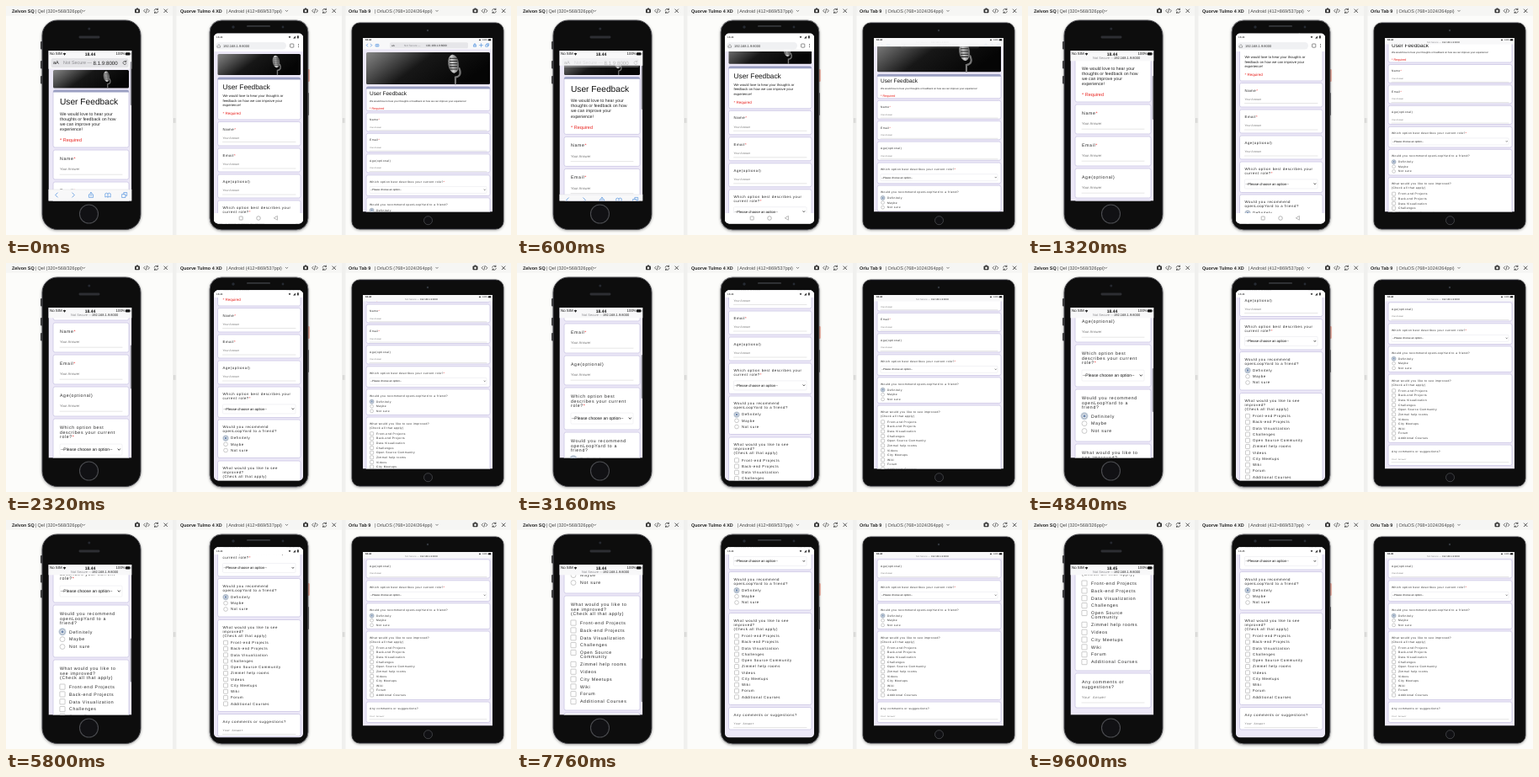
An HTML page for the animation above (9720 ms loop, 600x272 px).

```html
<!DOCTYPE html>
<html lang="en">
<head>
<meta charset="utf-8">
<title>User Feedback on three devices</title>
<style>
  html, body { margin: 0; width: 100%; height: 100%; overflow: hidden; background: #fcfcfa; }
  svg { display: block; width: 600px; height: 272px; font-family: "Liberation Sans", Arial, sans-serif; }
  text { text-rendering: geometricPrecision; white-space: pre; }
</style>
</head>
<body>
<script>
const LOOP = 9720;
const CLOCK_TICK = 8000;
const THUMB_HIDE = 9600;

// start, end, steps, then where each page has scrolled to at the end
const SCROLLS = [
  [40, 120, 3, 6, 5, 4],
  [440, 1320, 15, 54, 46, 57.5],
  [1440, 1440, 1, 58, 49, 60],
  [1640, 2320, 6, 100, 84, 78],
  [2600, 3160, 5, 137, 112, 92],
  [3440, 4040, 4, 160, 138, 113],
  [4440, 4840, 3, 188, 164.5, 129],
  [5000, 5320, 3, 212, 188, 129],
  [5560, 5800, 2, 237, 200.5, 129],
  [6120, 6960, 6, 282, 208.5, 129],
  [7240, 7480, 2, 304, 208.5, 129],
  [7760, 7760, 1, 313, 208.5, 129],
  [8000, 8480, 3, 340, 208.5, 129],
  [8880, 8880, 1, 354, 208.5, 129],
  [9240, 9240, 1, 360, 208.5, 129]
];

const ROLES = ['Definitely', 'Maybe', 'Not sure'];
const TOPICS = ['Front-end Projects', 'Back-end Projects', 'Data Visualization', 'Challenges',
  'Open Source Community', 'Zimmel help rooms', 'Videos', 'City Meetups', 'Wiki', 'Forum',
  'Additional Courses'];

const phone = {
  id: 'phone', screen: [50.5, 53, 98.8, 178.5], card: [56, 90], x: 64, itemX: 75, mark: 67,
  image: [76, 21.5], tops: [100, 171, 209, 247, 285, 338, 403, 542],
  bottoms: [168, 206, 244, 282, 335, 400, 539, 583],
  title: [10.2, 14], intro: [5.2, 28], required: [5.5, 59.5], font: 5.2, spacing: .66, small: 4.2,
  pad: 10, lead: 5.8, answer: 13, rule: 6.2, select: [15, 6.5, 5], first: 10.5, pitch: 8.85, box: 3.1,
  copy: 'We would love to hear your|thoughts or feedback on how|we can improve your|experience!',
  role: 'Which option best|describes your current|role?*',
  friend: 'Would you recommend|openLoopYard to a|friend?',
  topics: 'What would you like to|see improved?|(Check all that apply)',
  comments: 'Any comments or|suggestions?', wrapTopic: true
};
const tall = {
  id: 'tall', screen: [247, 32.5, 106, 226], card: [251.5, 98.5], x: 257.5, itemX: 267, mark: 261,
  image: [57, 25], tops: [85, 137.5, 169, 200, 231, 270, 319, 431],
  bottoms: [135, 166, 197, 228, 267.5, 315.5, 428, 457.5],
  title: [8.3, 11], intro: [4.15, 22], required: [4.5, 43], font: 4.3, spacing: .55, small: 3.5,
  pad: 8.7, lead: 5, answer: 10.5, rule: 4.8, select: [12.7, 5.5, 4.2], first: 8.6, pitch: 7.25, box: 2.5,
  copy: 'We would love to hear your thoughts or|feedback on how we can improve your|experience!',
  role: 'Which option best describes your|current role?*',
  friend: 'Would you recommend|openLoopYard to a friend?',
  topics: 'What would you like to see|improved?|(Check all that apply)',
  comments: 'Any comments or suggestions?'
};
const tablet = {
  id: 'tablet', screen: [424, 38, 154, 206.5], card: [428, 147], x: 432, itemX: 440, mark: 434.6,
  image: [55, 38], tops: [96, 127, 151.3, 175.8, 200.8, 227.8, 261, 345],
  bottoms: [124.5, 149, 173.5, 198, 225.5, 258.5, 342.5, 369.5],
  title: [6.5, 8], intro: [2.87, 16.7], required: [3.7, 25.5], font: 3.3, spacing: .43, small: 2.5,
  pad: 7.9, lead: 4.6, answer: 8.8, rule: 4, select: [9.7, 4, 3], first: 7.2, pitch: 5.63, box: 2,
  copy: 'We would love to hear your thoughts or feedback on how we can improve your experience!',
  role: 'Which option best describes your current role?*',
  friend: 'Would you recommend openLoopYard to a friend?',
  topics: 'What would you like to see improved?|(Check all that apply)',
  comments: 'Any comments or suggestions?'
};
const devices = [phone, tall, tablet];

const rect = (x, y, w, h, fill, r = 0, more = '') =>
  `<rect x="${x}" y="${y}" width="${w}" height="${h}" rx="${r}" fill="${fill}" ${more}/>`;
const circle = (x, y, r, fill, more = '') => `<circle cx="${x}" cy="${y}" r="${r}" fill="${fill}" ${more}/>`;
const line = (d, color, width = .6) =>
  `<path d="${d}" fill="none" stroke="${color}" stroke-width="${width}" stroke-linecap="round"/>`;
// y is the vertical middle of the lower-case letters
const text = (x, y, words, size, fill = '#222', more = '') =>
  `<text x="${x}" y="${y + size * .33}" font-size="${size}" fill="${fill}" ${more}>${words}</text>`;
const group = (id, body, more = '') => `<g id="${id}" ${more}>${body}</g>`;

function banner(d) {
  const [x, w] = d.card, [y, h] = d.image;
  const cx = x + w * .705, r = h * .2;
  let grill = '';
  for (let i = -2; i <= 2; i++) {
    const gy = y + h * .36 + i * r * .42;
    grill += line(`M${cx - r * .55} ${gy}h${r * 1.1}`, '#222', r * .14);
  }
  return rect(x, y, w, h, 'url(#stage)', 1.5) +
    line(`M${cx + r * .9} ${y + h * .5}q${r * .5} ${h * .25} ${-r * .6} ${h * .28}V${y + h - .5}`, '#777', r * .28) +
    `<ellipse cx="${cx}" cy="${y + h * .36}" rx="${r * .85}" ry="${r * 1.45}" fill="url(#metal)" transform="rotate(-8 ${cx} ${y + h * .36})"/>` + grill;
}

function page(d) {
  const [cx, cw] = d.card;
  const right = cx + cw - (d.x - cx);
  const spaced = `letter-spacing="${d.spacing}"`;
  const card = i => rect(cx, d.tops[i], cw, d.bottoms[i] - d.tops[i], '#fff', 2.2, 'stroke="#cbc6e4" stroke-width=".8"');
  const lastLine = (i, copy) => d.tops[i] + d.pad + (copy.split('|').length - 1) * d.lead;
  const label = (i, copy) => card(i) + copy.split('|').map((s, k) =>
    text(d.x, d.tops[i] + d.pad + k * d.lead, s.replace('*', '<tspan fill="#e22">*</tspan>'), d.font, '#222', spaced)).join('');
  const answer = (i, copy, more = '') => {
    const y = lastLine(i, copy) + d.answer;
    return label(i, copy) + text(d.x, y, 'Your Answer', d.small, '#777', more) +
      line(`M${d.x} ${y + d.rule}H${right}`, '#ccc', .5);
  };
  const option = (y, s) => text(d.itemX, y, s, d.font, '#222', spaced);

  let out = banner(d) + card(0) +
    `<path d="M${cx} ${d.tops[0] + 2.4}v-.6q0-2 2-2h${cw - 4}q2 0 2 2v.6z" fill="#9ba0c3"/>` +
    text(d.x, d.tops[0] + d.title[1], 'User Feedback', d.title[0], '#111') +
    d.copy.split('|').map((s, k) =>
      text(d.x, d.tops[0] + d.intro[1] + k * d.lead * 1.06, s, d.intro[0])).join('') +
    text(d.x, d.tops[0] + d.required[1], '* Required', d.required[0], '#e8201c') +
    answer(1, 'Name*') + answer(2, 'Email*') + answer(3, 'Age(optional)');

  const [drop, half, size] = d.select;
  let y = lastLine(4, d.role) + drop;
  out += label(4, d.role) + rect(d.x, y - half, right - d.x, half * 2, '#fff', 1, 'stroke="#e4e4ea" stroke-width=".5"') +
    text(d.x + 1, y, '--Please choose an option--', size, '#111') +
    line(`M${right - size} ${y - size * .15}l${size * .25} ${size * .3}l${size * .25} ${-size * .3}`, '#222', size * .16);

  out += label(5, d.friend);
  y = lastLine(5, d.friend) + d.first - .3;
  ROLES.forEach((s, k) => {
    const ry = y + k * d.pitch;
    out += k ? circle(d.mark, ry, d.box * .95, '#fff', 'stroke="#999" stroke-width=".5"')
      : circle(d.mark, ry, d.box * 1.45, '#c3cfdd') +
        circle(d.mark, ry, d.box, '#e8eef5', 'stroke="#7d8794" stroke-width=".5"') +
        circle(d.mark, ry, d.box * .5, '#6d87ad');
    out += option(ry, s);
  });

  out += label(6, d.topics);
  y = lastLine(6, d.topics) + d.first;
  for (const s of TOPICS) {
    out += rect(d.mark - d.box, y - d.box, d.box * 2, d.box * 2, '#fff', .6, 'stroke="#999" stroke-width=".5"');
    if (d.wrapTopic && s.length > 20) {
      const cut = s.lastIndexOf(' ');
      out += option(y, s.slice(0, cut));
      y += 5;
      out += option(y, s.slice(cut + 1));
    } else out += option(y, s);
    y += d.pitch;
  }
  return out + answer(7, d.comments, 'font-family="Liberation Mono, monospace" letter-spacing=".1"');
}

const clock = (x, y, size, more) => text(x, y, '18.44', size, '#111', `class="clock" ${more || ''}`);
const wifi = (x, y, r) => `<path d="M${x} ${y + r}l${-r} ${-r * 1.3}q${r} ${-r * .8} ${2 * r} 0z" fill="#222"/>`;
const BLUE = '#3f86dc';
const back = (x, y, r) => line(`M${x + r / 2} ${y - r}l${-r} ${r}l${r} ${r}`, BLUE, .7);
const next = (x, y, r) => line(`M${x - r / 2} ${y - r}l${r} ${r}l${-r} ${r}`, BLUE, .7);
const share = (x, y, r) => line(`M${x - r * .4} ${y - r * .2}h${-r * .4}v${r * 1.1}h${r * 1.6}v${-r * 1.1}h${-r * .4}M${x} ${y + r * .4}V${y - r}l${-r * .4} ${r * .4}m${r * .4} ${-r * .4}l${r * .4} ${r * .4}`, BLUE);
const book = (x, y, r) => line(`M${x} ${y - r * .5}q${-r * .5} ${-r * .5} ${-r} 0v${r * 1.3}q${r * .5} ${-r * .4} ${r} 0q${r * .5} ${-r * .4} ${r} 0v${-r * 1.3}q${-r * .5} ${-r * .5} ${-r} 0v${r * 1.3}`, BLUE);
const tabs = (x, y, r) => line(`M${x - r} ${y - r * .3}h${r * 1.3}v${r * 1.3}h${-r * 1.3}zM${x - r * .4} ${y - r * .4}v${-r * .6}h${r * 1.3}v${r * 1.3}h${-r * .5}`, BLUE);
const address = '192.168.1.9:8000';

function phoneChrome() {
  return rect(50, 53, 100, 12.3, '#f8f8f9', 0, 'id="phoneBar"') +
    group('phoneFull', rect(53.5, 62, 92, 11, '#e4e4e7', 2.5) + text(56, 67.5, 'aA', 5.6) +
      text(68, 67.5, 'Not Secure —', 5.4, '#8a8a8e') + text(103.5, 67.5, '8.1.9:8000', 6.2) +
      line('M142.6 66.2a2 2 0 1 0 .3 2M142.8 64.8v1.6h-1.6', '#333')) +
    group('phoneMini', text(77, 62, 'Not Secure —', 4, '#8a8a8e') + text(102, 62, address, 4, '#222')) +
    text(52, 57, 'No SIM', 4.4, '#111') + wifi(69.5, 57, 1.8) + clock(100, 57, 5, 'text-anchor="middle" font-weight="bold"') +
    text(130.5, 57, '100%', 4.4, '#111') + rect(142, 55.3, 5.4, 3.2, '#111', .8) + rect(147.7, 56.3, .6, 1.2, '#111') +
    group('phoneTools', rect(50, 218, 100, 14, '#f8f8f9') + line('M50 218h100', '#d5d5d8', .4) +
      back(60, 224.5, 2.6) + next(80, 224.5, 2.6) + share(101, 224.5, 3.2) + book(121, 224.5, 3.2) + tabs(141, 224.5, 3)) +
    rect(147.7, 66, 1.3, 52, '#8d8d95', .65, 'id="thumb"');
}

function tallChrome() {
  return group('tallBar', rect(247, 40, 106, 14, '#fff') + rect(249, 43, 84, 8.4, '#f0f1f3', 4.2) +
      line('M251.3 47.3l1.6-1.6l1.6 1.6v1.8h-3.2z', '#555', .5) + text(258, 47.2, address, 4, '#333') +
      rect(337.6, 45, 4.2, 4.2, 'none', .7, 'stroke="#444" stroke-width=".6"') +
      [45.4, 47.1, 48.8].map(y => circle(347.5, y, .5, '#444')).join('')) +
    rect(247, 32, 106, 9, '#fff') + clock(250, 37, 3) + wifi(337, 37, 1.3) +
    `<path d="M341 38.5h3v-3z" fill="#333"/>` + rect(346, 35.3, 1.8, 3.2, '#333', .4) +
    group('tallNav', rect(247, 246, 106, 13, '#fff') +
      rect(277.2, 250, 4, 4, 'none', .4, 'stroke="#888" stroke-width=".6"') +
      circle(300, 252, 2.3, 'none', 'stroke="#888" stroke-width=".6"') + line('M322.4 249.8v4.4l-3.8-2.2z', '#888'));
}

function tabletChrome() {
  return rect(424, 38, 154, 8, '#f8f8f9', 0, 'id="tabletBar"') +
    group('tabletFull', back(429, 46.6, 1.5) + next(434, 46.6, 1.5) + book(441, 46.6, 1.9) +
      rect(456, 43.2, 93, 7, '#e6e6e9', 1.6) + text(458, 46.7, 'aA', 3) + text(473, 46.7, 'Not Secure —', 3.1, '#8a8a8e') +
      text(499, 46.7, address, 3.2) + share(557, 46.6, 1.9) + line('M562.5 46.6h4m-2-2v4', BLUE) + tabs(572, 46.5, 1.8)) +
    group('tabletMini', text(474, 43.5, 'Not Secure —', 2.7, '#8a8a8e') + text(492, 43.5, address, 2.7, '#222')) +
    clock(427, 40.3, 2.8, 'font-weight="bold"') + wifi(563, 40.3, 1.2) + text(566, 40.3, '100%', 2.5, '#111') +
    rect(573, 39.3, 3.3, 2, '#111', .5);
}

const bodies = {
  phone: [42, 52, 65, 83].slice(0, 1).concat(65, 83).map(y => rect(41, y, 3, 9.5, '#3b3b3d', 1)).join('') +
    rect(43, 17, 117, 248.5, '#08080a', 18, 'stroke="#4c4c50" stroke-width="1" filter="url(#shadow)"') +
    circle(98.8, 27, 1.5, '#25282f') + rect(86.5, 35.6, 25, 2.8, '#2d2e33', 1.4) +
    circle(98.5, 247, 11, '#111114', 'stroke="#4b4c50" stroke-width="1.1"'),
  tall: rect(357.5, 75, 3, 15, '#f5866f', 1) + rect(357.5, 103, 2.5, 27, '#333', 1) +
    rect(242, 17, 117, 249, '#0b0b0d', 14, 'stroke="#77777b" stroke-width="1" filter="url(#shadow)"') +
    rect(286, 23, 28, 1.8, '#35363a', .9) + circle(270, 25, 1.7, '#262a32') + circle(329, 25, 1.4, '#262a32'),
  tablet: rect(411, 20, 180, 245, '#08080a', 9, 'stroke="#38383c" stroke-width=".9" filter="url(#shadow)"') +
    circle(501, 29, 1.2, '#33363d') + circle(501.5, 254.7, 5, '#101013', 'stroke="#4b4c50" stroke-width=".8"')
};
const chrome = { phone: phoneChrome, tall: tallChrome, tablet: tabletChrome };

function device(d) {
  const [x, y, w, h] = d.screen;
  return bodies[d.id] + `<clipPath id="${d.id}Clip">${rect(x, y, w, h, '#000', d === tall ? 5 : 0)}</clipPath>` +
    `<g clip-path="url(#${d.id}Clip)">` + rect(x, y, w, h, '#ece8f7') +
    group(d.id + 'Page', page(d)) + chrome[d.id]() + '</g>';
}

function heading(x, name, specX, spec, arrowX, iconX) {
  const ink = '#333';
  return text(x, 5.8, name, 5.4, '#222', 'font-weight="bold"') + text(specX, 5.8, spec, 5.5, '#444') +
    line(`M${arrowX - 1.3} 5.2l1.3 1.3l1.3-1.3`, ink) +
    rect(iconX - 3, 3.6, 6, 4.6, ink, .9) + rect(iconX - 1.2, 2.6, 2.4, 1.5, ink, .4) + circle(iconX, 5.9, 1.3, '#f6f6f4') +
    line(`M${iconX + 9.3} 4l-1.7 1.8l1.7 1.8M${iconX + 12.7} 4l1.7 1.8l-1.7 1.8M${iconX + 11.6} 3.4l-1.2 4.8`, ink, .7) +
    line(`M${iconX + 20.2} 5.2a2.3 2.3 0 0 1 4.2-.8v-1.4m0 1.4h-1.4M${iconX + 24.8} 6.4a2.3 2.3 0 0 1-4.2.8v1.4m0-1.4h1.4`, ink, .7) +
    line(`M${iconX + 31.8} 3.9l3.8 3.8m0-3.8l-3.8 3.8`, ink, .8);
}

const stop = (at, color) => `<stop offset="${at}" stop-color="${color}"/>`;
document.body.innerHTML = `<svg viewBox="0 0 600 272" xmlns="http://www.w3.org/2000/svg"><defs>
  <linearGradient id="stage" x2="1" y2=".35">${stop(0, '#858585')}${stop(.22, '#565656')}${stop(.5, '#171717')}${stop(1, '#050505')}</linearGradient>
  <linearGradient id="metal">${stop(0, '#666')}${stop(.4, '#d2d2d2')}${stop(1, '#555')}</linearGradient>
  <filter id="shadow" x="-10%" y="-5%" width="120%" height="112%"><feDropShadow dx="0" dy="1" stdDeviation="1.4" flood-opacity=".35"/></filter>
  </defs>` + rect(0, 0, 600, 272, '#fcfcfa') + rect(0, 0, 600, 11.5, '#f6f6f4') +
  [198, 399].map(x => rect(x, 0, 4.5, 272, '#f0f0ee') +
    line(`M${x + 1.5} 133.5v5m1.5-5v5`, '#b5b5b3', .5)).join('') +
  heading(7, 'Zelvon SQ', 34.5, '| Qel (320×568/326ppi)', 92.5, 156) +
  heading(207, 'Quorve Tulmo 4 XD', 261.5, '| Android (412×869/537ppi)', 333.5, 356) +
  heading(407, 'Orlu Tab 9', 437.5, '| OrluOS (768×1024/264ppi)', 512, 557.5) +
  devices.map(device).join('') + '</svg>';

const poses = [{ at: 0, scroll: [0, 0, 0] }];
for (const [start, end, steps, ...goal] of SCROLLS) {
  const from = poses[poses.length - 1].scroll;
  for (let k = 0; k < steps; k++) {
    const at = steps > 1 ? 40 * Math.round((start + (end - start) * k / (steps - 1)) / 40) : start;
    poses.push({ at, scroll: goal.map((g, i) => from[i] + (g - from[i]) * (k + 1) / steps) });
  }
}

const el = id => document.getElementById(id);
const set = (id, name, value) => el(id).setAttribute(name, value);
const shift = (id, y) => set(id, 'transform', `translate(0 ${y})`);
const ramp = (v, from, to) => Math.min(1, Math.max(0, (v - from) / (to - from)));
const clocks = document.querySelectorAll('.clock');

function draw(t) {
  const { scroll } = poses.findLast(p => p.at <= t);
  devices.forEach((d, i) => shift(d.id + 'Page', -scroll[i]));

  const phoneFold = ramp(scroll[0], 8, 26);
  set('phoneBar', 'height', 21.7 - 9.4 * phoneFold);
  set('phoneFull', 'opacity', 1 - ramp(phoneFold, 0, .6));
  set('phoneMini', 'opacity', ramp(phoneFold, .5, 1));
  shift('phoneTools', 14 * phoneFold);
  shift('thumb', 113 * scroll[0] / 360);
  set('thumb', 'opacity', t < THUMB_HIDE ? 1 : 0);

  const tallFold = ramp(scroll[1], 50, 75);
  shift('tallBar', -14 * tallFold);
  shift('tallNav', 14 * tallFold);

  const tabletFold = ramp(scroll[2], 6, 22);
  set('tabletBar', 'height', 13.3 - 5.8 * tabletFold);
  set('tabletFull', 'opacity', 1 - ramp(tabletFold, 0, .6));
  set('tabletMini', 'opacity', ramp(tabletFold, .5, 1));

  const time = t < CLOCK_TICK ? '18.44' : '18.45';
  clocks.forEach(c => { c.textContent = time; });
}

const began = performance.now();
function tick() {
  draw((performance.now() - began) % LOOP);
  requestAnimationFrame(tick);
}
tick();
</script>
</body>
</html>
```
